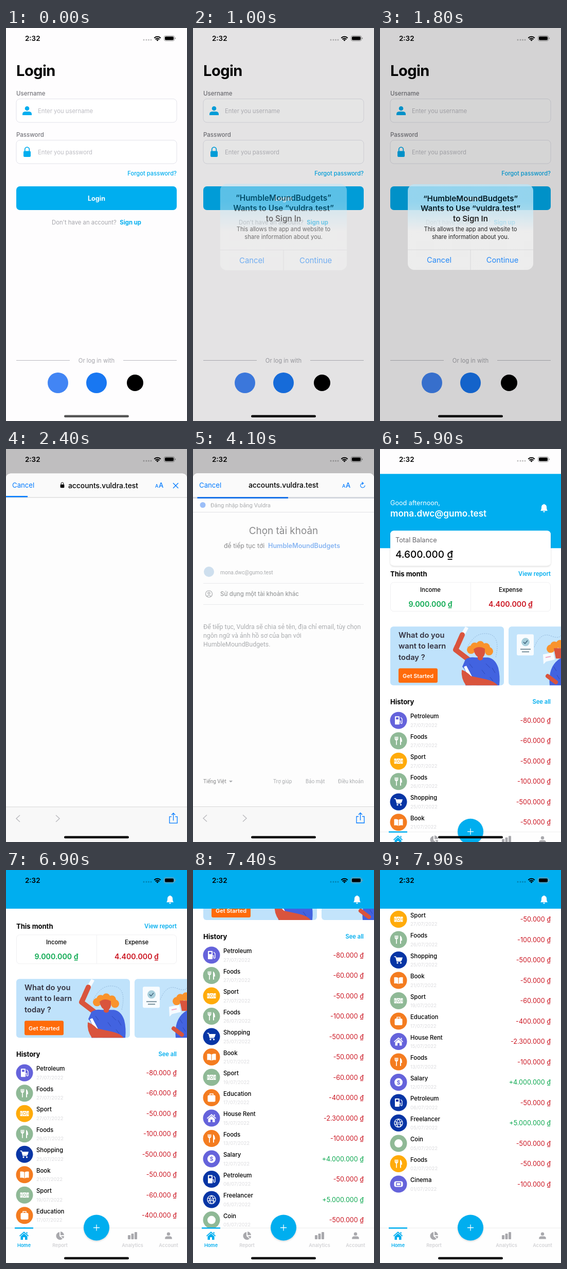
Write an HTML page that moves like this. It is 352 px wide and 762 px high and loops after 8 s.

```html
<!DOCTYPE html>
<html lang="en">
<head>
<meta charset="utf-8">
<title>Budget app sign-in</title>
<style>
html, body { margin: 0; width: 100%; height: 100%; overflow: hidden; background: #fff; }
svg { display: block; font-family: Inter, sans-serif; }
</style>
</head>
<body>
<svg id="stage" width="352" height="762" viewBox="0 0 352 762"></svg>
<script>
const SKY = '#00aeef', LINK = '#007aff', RED = '#cb1420', GREEN = '#0aa84f';
const APP = 'HumbleMoundBudgets', SITE = 'vuldra.test', EMAIL = 'mona.dwc@gumo.test';

// y is the vertical middle of the capitals
const text = (x, y, s, size, fill = '#000', weight = 400, anchor = 'start', more = '') =>
  `<text x="${x}" y="${y + size * .364}" font-size="${size}" fill="${fill}" font-weight="${weight}" text-anchor="${anchor}" ${more}>${s}</text>`;
const mid = (x, y, s, size, fill, weight) => text(x, y, s, size, fill, weight, 'middle');
const end = (x, y, s, size, fill, weight) => text(x, y, s, size, fill, weight, 'end');
const rect = (x, y, w, h, fill, r = 0, more = '') =>
  `<rect x="${x}" y="${y}" width="${w}" height="${h}" rx="${r}" fill="${fill}" ${more}/>`;
const circle = (x, y, r, fill, more = '') => `<circle cx="${x}" cy="${y}" r="${r}" fill="${fill}" ${more}/>`;
const path = (d, fill, more = '') => `<path d="${d}" fill="${fill}" ${more}/>`;
const line = (d, stroke, w = 1, more = '') => path(d, 'none', `stroke="${stroke}" stroke-width="${w}" ${more}`);
const at = (x, y, s, k = 1) => `<g transform="translate(${x} ${y}) scale(${k})">${s}</g>`;
const group = (id, s) => `<g id="${id}">${s}</g>`;

const person = c => circle(0, -4.5, 4.3, c) + path('M-9 8.5v-2q0-5 6-5h6q6 0 6 5v2z', c);
const padlock = c => rect(-7, -2, 14, 11.5, c, 2) + line('M-4.3 -1v-4a4.3 4.3 0 0 1 8.6 0v4', c, 1.8);
const bell = path('M-7 5q2-2 2-7q0-4.5 4-5.2a1 1 0 0 1 2 0q4 .7 4 5.2q0 5 2 7zM-2 6h4a2 2 0 0 1-4 0', '#fff');
const home = c => path('M-9 0L0 -8L9 0L8 1.5L0 -5.5L-8 1.5zM4.5 -7h2v4l-2-2zM-6.5 1.5L0 -4.2L6.5 1.5V8H2V3h-4V8h-4.5z', c);

// white glyphs on a disc of colour c
const glyphs = {
  pump: c => rect(-7, -8, 9, 16, '#fff', 1) + rect(-5, -6, 5, 4, c) +
    line('M2 1h2v4q1.5 2 3 0v-8l-3-3', '#fff', 1.3),
  food: () => line('M-4 -8v16M-6.5 -8v4q0 2.5 2.5 2.5t2.5 -2.5v-4', '#fff', 1.7) +
    path('M3 -8q4 2 4 10H5v6H3z', '#fff'),
  ticket: c => rect(-8.5, -5, 17, 10, '#fff', 1) + circle(0, 0, 2.4, 'none', `stroke="${c}"`) +
    line('M-4 -5v10M4 -5v10', c, 1, 'stroke-dasharray="1.5 1"') + line('M-8.5 -1.5h2v3h-2M8.5 -1.5h-2v3h2', c, .8),
  cart: () => line('M-8.5 -6.5h3l2.5 9h8', '#fff', 1.5) + path('M-5 -5H8L6 1.5H-3z', '#fff') +
    circle(-2, 5.5, 1.6, '#fff') + circle(4.5, 5.5, 1.6, '#fff'),
  book: () => path('M-.5 -5q-4-2-8-1V6q4-1 8 1zM.5 -5q4-2 8-1V6q-4-1-8 1z', '#fff'),
  bag: () => rect(-7.5, -5, 15, 13, '#fff', 2.5) + line('M-3 -5v-2.5h6v2.5', '#fff', 1.5),
  house: () => home('#fff'),
  money: c => circle(0, 0, 8, '#fff') + mid(0, 0, '$', 11, c, 600),
  globe: () => line('M-8 0a8 8 0 1 0 16 0a8 8 0 1 0-16 0M-7 -3Q0 1 7 -3M-7 3Q0 0 7 4M0 -8Q-7 0 0 8M0 -8Q6 0 3 7', '#fff', 1.3),
  coin: () => circle(0, 0, 8, '#fff'),
  film: c => rect(-8.5, -5.5, 17, 11, '#fff', 4) + rect(-5, -3.5, 10, 7, c, 1) + rect(-3.5, -2, 7, 4, '#fff')
};
const VIOLET = '#6563db', SAGE = '#8fb996', AMBER = '#ffab0a', NAVY = '#0735a5', ORANGE = '#f47c20';
const records = [
  ['Petroleum', 27, '-80.000', 'pump', VIOLET], ['Foods', 27, '-60.000', 'food', SAGE],
  ['Sport', 27, '-50.000', 'ticket', AMBER], ['Foods', 26, '-100.000', 'food', SAGE],
  ['Shopping', 25, '-500.000', 'cart', NAVY], ['Book', 21, '-50.000', 'book', ORANGE],
  ['Sport', 19, '-60.000', 'ticket', SAGE], ['Education', 17, '-400.000', 'bag', ORANGE],
  ['House Rent', 15, '-2.300.000', 'house', VIOLET], ['Foods', 13, '-100.000', 'food', ORANGE],
  ['Salary', 12, '+4.000.000', 'money', VIOLET], ['Petroleum', '06', '-50.000', 'pump', NAVY],
  ['Freelancer', '05', '+5.000.000', 'globe', NAVY], ['Coin', '05', '-500.000', 'coin', SAGE],
  ['Foods', '02', '-50.000', 'food', AMBER], ['Cinema', '01', '-100.000', 'film', VIOLET]
];
const record = ([name, day, sum, icon, c], i) => at(0, 478 + i * 39.5,
  circle(36, 0, 16.5, c) + at(36, 0, glyphs[icon](c)) +
  text(59, -8, name, 11.4, '#000', 500) + text(59, 9, day + '/07/2022', 9.5, '#dcdcdf') +
  end(332, 0, sum + ' ₫', 12.6, sum[0] === '+' ? GREEN : RED));

const field = (y, label, icon, hint) => text(20, y - 10.5, label, 11.5, '#76767c', 500) +
  rect(20, y, 312, 45.5, '#fff', 7, 'stroke="#e2e2ea"') + at(41, y + 23, icon) + text(62, y + 23, hint, 11.3, '#bdbdc3');

const login = rect(0, 0, 352, 762, '#fefdfe') + text(20, 82, 'Login', 29, '#000', 700, 'start', 'letter-spacing="-.5"') +
  field(137.5, 'Username', person(SKY), 'Enter you username') +
  field(217.5, 'Password', padlock(SKY), 'Enter you password') +
  end(332, 282, 'Forgot password?', 11.2, SKY, 500) +
  rect(20, 307, 312, 46, SKY, 7) + mid(176, 330, 'Login', 12.6, '#fff', 700) +
  text(89, 376.5, "Don't have an account?", 11.3, '#a5a5ab') + end(263, 376.5, 'Sign up', 11.4, SKY, 700) +
  line('M20 644.5H124M228 644.5H332', '#b9b9bf') + mid(176, 644.5, 'Or log in with', 11.25, '#a5a5ab') +
  circle(101, 688, 20, '#4285f4') + circle(176, 688, 20, '#1877f2') + circle(251, 688, 16, '#000');

const status = text(37, 20, '2:32', 13.4, '#000', 600) +
  [268, 273, 277.5, 282].map(x => circle(x, 23, 1.5, '#000', 'opacity=".25"')).join('') +
  at(294.5, 25, line('M-6.2 -5.6a8.7 8.7 0 0 1 12.4 0M-3.9 -3a5.4 5.4 0 0 1 7.8 0', '#000', 2.1) + path('M0 .6l-2.2-2.2a3.2 3.2 0 0 1 4.4 0z', '#000')) +
  rect(307.5, 15, 20, 10, 'none', 3, 'stroke="#999"') + rect(309, 16.5, 17, 7, '#000', 1.8) + rect(328.5, 18.5, 1.5, 3, '#999', .7);

const alertBox = rect(54, 303, 244, 166, 'url(#frost)', 12.5, 'opacity=".97"') +
  mid(176, 330, `“${APP}”`, 15.2, '#000', 600) + mid(176, 350, `Wants to Use “${SITE}”`, 15.1, '#000', 600) +
  mid(176, 370, 'to Sign In', 15.1, '#000', 600) +
  mid(176, 390, 'This allows the app and website to', 11.1) + mid(176, 404.5, 'share information about you.', 11.1) +
  line('M54 430H298M176 430V469', '#cfcfd2', .7) +
  mid(115, 450, 'Cancel', 14.7, LINK) + mid(238, 450, 'Continue', 14.7, LINK);

const roboto = (x, y, s, size, fill = '#5f6368') => text(x, y, s, size, fill, 400, 'start', 'font-family="Roboto, sans-serif"');
const accountPage = group('accounts',
  circle(19, 108.5, 5.5, '#4285f4') + roboto(34, 108.5, 'Đăng nhập bằng Vuldra', 11.3) + line('M0 122.5H352', '#c9cbd0') +
  mid(176, 158, 'Chọn tài khoản', 18.9, '#202124') +
  text(60, 187.5, 'để tiếp tục tới', 12.3, '#202124') + text(146, 187.5, APP, 12.6, '#1a73e8', 600) +
  circle(31, 238, 10, '#a4c4e2') + roboto(53, 239, EMAIL, 10.2) + line('M20 260.5H332M20 301.5H332', '#d5d7db') +
  circle(31, 281, 6.5, 'none', 'stroke="#5f6368" stroke-width="1.2"') + circle(31, 279.3, 2, 'none', 'stroke="#5f6368" stroke-width="1.2"') +
  line('M27 286q4-4.5 8 0', '#5f6368', 1.2) + text(53, 281, 'Sử dụng một tài khoản khác', 11.5, '#3c4043', 500) +
  ['Để tiếp tục, Vuldra sẽ chia sẻ tên, địa chỉ email, tùy chọn', 'ngôn ngữ và ảnh hồ sơ của bạn với', APP + '.']
    .map((s, i) => roboto(20, 344 + i * 17.3, s, 12.4)).join('') +
  roboto(20, 644.5, 'Tiếng Việt', 10, '#202124') + path('M70 643h7l-3.5 3.5z', '#5f6368') +
  roboto(156, 644.5, 'Trợ giúp', 10) + roboto(219, 644.5, 'Bảo mật', 10) + roboto(282, 644.5, 'Điều khoản', 10)) +
  group('busy', rect(0, 93, 352, 3, '#d3d7de') + rect(0, 93, 0, 3, '#1a73e8', 0, 'id="sweep"'));

const title = s => mid(176, 70, s, 13.9, '#000', 500);
const sheet = path('M0 762V56a9 9 0 0 1 9-9H343a9 9 0 0 1 9 9V762z', '#fdfdfd') +
  path('M0 93V56a9 9 0 0 1 9-9H343a9 9 0 0 1 9 9V93z', '#fafafa') + line('M0 93.5H352', '#cfcfcf') +
  text(12, 70, 'Cancel', 13.2, LINK) + text(290, 71.5, 'A', 9, LINK, 500) + text(297, 70, 'A', 13, LINK, 500) +
  group('loading', at(13, 0, title('accounts.' + SITE)) + at(109.5, 69.5, padlock('#000'), .55) +
    line('M325 65.5l10 10m0-10l-10 10', LINK, 1.4) + rect(0, 90.5, 0, 2.5, LINK, 0, 'id="bar"')) +
  group('loaded', title('accounts.' + SITE) + line('M331 66.5a4.3 4.3 0 1 0 3.3 4M328.5 64l3 2.5l-3 2.5', LINK, 1.1) + accountPage) +
  rect(0, 693, 352, 69, '#f8f8f8') + line('M0 693.5H352', '#d8d8d8') +
  line('M27 709.5l-7 6.5l7 6.5M97 709.5l7 6.5l-7 6.5', '#bcbcc0', 1.5) +
  line('M322 712.5h-4v12.5h15v-12.5h-4M325.5 720v-14M322 709l3.5-3.5l3.5 3.5', LINK, 1.3);

const SKIN = '#d9543d', HAIR = '#f9932c', DRESS = '#4263e0', INK = '#2f49b8';
const curls = (x, y) => [[-16, 3], [-9, -3], [2, -6], [13, -2], [19, 6]].map(([dx, dy]) => circle(x + dx, y + dy, 8, HAIR)).join('');
const bannerOne = rect(0, 0, 221, 114, '#bfe2fb', 6) + line('M150 40Q165 10 190 14T205 60', '#8fb4d8', 1, 'stroke-dasharray="2 2"') +
  path('M146 0l6 3l-20 36l-7-4z', '#f7fbff') + line('M140 16L127 45L152 64', SKIN, 10, 'stroke-linejoin="round" stroke-linecap="round"') +
  path('M146 64q8-6 20-4h24q14 2 20 20q4 16 2 34h-66q6-26-6-36z', DRESS) +
  line('M154 72l6 8M186 72l8 8M198 80l6 10M178 84l6 8M194 98l6 8', INK) +
  curls(173, 42) + path('M162 44q10-8 22-1v9q-2 9-9 9q-11-3-13-17z', SKIN) + path('M170 56h10v7q-5 5-10 0z', SKIN) +
  path('M143 78l5-2l20 38h-10z', '#f7fbff') + path('M139 84q8 2 18 12l28 6q16 3 24 12h-62q-10-14-8-30z', SKIN) +
  ['What do you', 'want to learn', 'today ?'].map((s, i) => text(16, 16 + i * 21.5, s, 14.7, '#33313f', 600)).join('') +
  rect(16, 81, 76, 28, '#ff6b0a', 3) + mid(54, 95.5, 'Get Started', 10.9, '#fff', 600);
const bannerTwo = rect(0, 0, 221, 114, '#c3e4fb', 6) + rect(16, 15, 33, 41, '#f8fcff', 3) + circle(33, 30, 8, '#a8cfdc') +
  line('M29 30l3 3l5-6', '#33566f', 1.3) + line('M23 44h20M26 49h14', '#78909c', 2) +
  line('M50 40Q62 10 82 18T104 12', '#8fb4d8', 1, 'stroke-dasharray="2 2"') +
  curls(98, 40) + path('M88 42h16v20h-12z', SKIN) +
  path('M80 114q-4-40 24-54v54z', DRESS) + line('M88 78l5 8M94 94l5 8', INK) +
  path('M67 54l20-4l3 14l-17 4l-5 5z', '#f7fbff') + line('M72 60l10-2', '#f2a9c4', 2) +
  line('M76 96L92 108', SKIN, 8, 'stroke-linecap="round"');

const content = text(20, 194, 'This month', 13, '#000', 700) + end(332, 194, 'View report', 11.2, SKY, 600) +
  rect(20.5, 210.5, 311, 56, '#fff', 6, 'stroke="#f0f0f2"') + line('M176.5 211V266', '#f0f0f2') +
  mid(98, 224.5, 'Income', 11.3, '#000', 500) + mid(254, 224.5, 'Expense', 11.3, '#000', 500) +
  mid(98, 252.5, '9.000.000 ₫', 14.2, GREEN, 600) + mid(254, 252.5, '4.400.000 ₫', 14.2, RED, 600) +
  at(20, 296, bannerOne) + at(250, 296, bannerTwo) +
  text(20, 442, 'History', 13, '#000', 700) + end(332, 442, 'See all', 11.2, SKY, 600) + records.map(record).join('');

const GREY = '#a9a9ad';
const tab = (x, name, icon, c = '#d3d3d6') => at(x, 709, icon) + mid(x, 727.5, name, 9.2, c, 600);
const tabs = rect(0, 694, 352, 68, '#fefefe') + line('M0 694H352', '#eee') + rect(17, 693, 36, 2.5, SKY) +
  tab(35, 'Home', home(SKY), SKY) +
  tab(105, 'Report', path('M-1 -7A7.5 7.5 0 1 0 5 6L-1 1z', GREY) + path('M1 -8A7.5 7.5 0 0 1 8 -1H1zM2 1H8q0 3-2 4.5z', GREY)) +
  tab(246, 'Analytics', rect(-9, -1, 5, 8, GREY, 1) + rect(-2.5, -4, 5, 11, GREY, 1) + rect(4, -7, 5, 14, GREY, 1)) +
  tab(316, 'Account', at(0, 0, person(GREY), .75)) +
  circle(176, 693.5, 25, SKY, 'filter="url(#shadow)"') + line('M170 693.5h12M176 687.5v12', '#fff', 1.3);

const homeScreen = rect(0, 0, 352, 762, '#fff') + group('content', content) + rect(0, 0, 352, 144, SKY, 0, 'id="header"') +
  group('greeting', text(20, 56.5, 'Good afternoon,', 12.6, '#fff') + text(20, 76.5, EMAIL, 17.1, '#fff', 600) +
    rect(20, 110, 312, 68, '#fff', 7, 'filter="url(#shadow)"') + text(30, 128, 'Total Balance', 12.7, '#66666b') +
    text(30, 156, '4.600.000 ₫', 19, '#000', 500)) +
  group('bell', bell) + tabs;

const stage = document.getElementById('stage');
stage.innerHTML = '<filter id="shadow" x="-20%" y="-20%" width="140%" height="150%"><feDropShadow dx="0" dy="1.5" stdDeviation="1.8" flood-opacity=".16"/></filter>' +
  '<linearGradient id="frost" x2="0" y2="1"><stop offset=".2" stop-color="#b9e5f7"/><stop offset=".55" stop-color="#f3f3f3"/></linearGradient>' +
  login + group('home', homeScreen) + status + rect(0, 0, 352, 762, '#000', 0, 'id="dim"') +
  group('alert', alertBox) + group('sheet', sheet) + rect(113, 750.5, 126, 4.5, '#000', 2.2, 'id="indicator"');

const set = (id, attrs) => {
  const el = document.getElementById(id);
  for (const key in attrs) el.setAttribute(key, attrs[key]);
};
const show = (id, on) => set(id, { display: on ? 'inline' : 'none' });
const shift = (id, y, x = 0) => set(id, { transform: `translate(${x} ${y})` });
const ramp = (t, a, b) => Math.min(1, Math.max(0, (t - a) / (b - a)));
const smooth = (t, a, b) => { const u = ramp(t, a, b); return u * u * (3 - 2 * u); };
// critically damped spring, falls from 1 to 0
const spring = ms => { const x = Math.max(0, ms) * .01826; return (1 + x) * Math.exp(-x); };

function draw(t) {
  const alertIn = 1 - spring(t - 908), alpha = alertIn * spring(t - 1760);
  const sheetUp = (1 - spring(t - 1870)) * spring(t - 4560);
  set('dim', { opacity: Math.max(.2 * alpha, .25 * sheetUp) });
  const k = 1 + .04 * (1 - alertIn) ** 2;
  set('alert', { opacity: alpha, transform: `translate(176 386) scale(${k}) translate(-176 -386)` });

  shift('sheet', 716 * (1 - sheetUp));
  show('loading', t < 3700);
  show('loaded', t >= 3700);
  set('bar', { width: 42 * ramp(t, 1900, 2400) + 18 * ramp(t, 2400, 2650) + 250 * smooth(t, 2650, 3350) });
  set('accounts', { opacity: 1 - .48 * ramp(t, 3850, 4050) });
  show('busy', t >= 3900);
  const from = Math.max(0, (t - 4080) * .4), to = Math.min(352, Math.max(0, (t - 3900) * .92));
  set('sweep', { x: from, width: Math.max(0, to - from) });

  shift('home', 762 * spring(t - 5657));
  const scroll = 463 * smooth(t, 6507, 7950), fold = Math.min(1, scroll / 69);
  shift('content', -scroll);
  shift('greeting', -scroll);
  set('greeting', { opacity: Math.max(0, 1 - scroll / 60) });
  set('header', { height: 144 - 69 * fold });
  shift('bell', 66.5 - 9 * fold, 319);
  set('indicator', { fill: t < 800 ? '#555' : '#000' });
}
(function frame() {
  draw(performance.now() % 8000);
  requestAnimationFrame(frame);
})();
</script>
</body>
</html>
```
